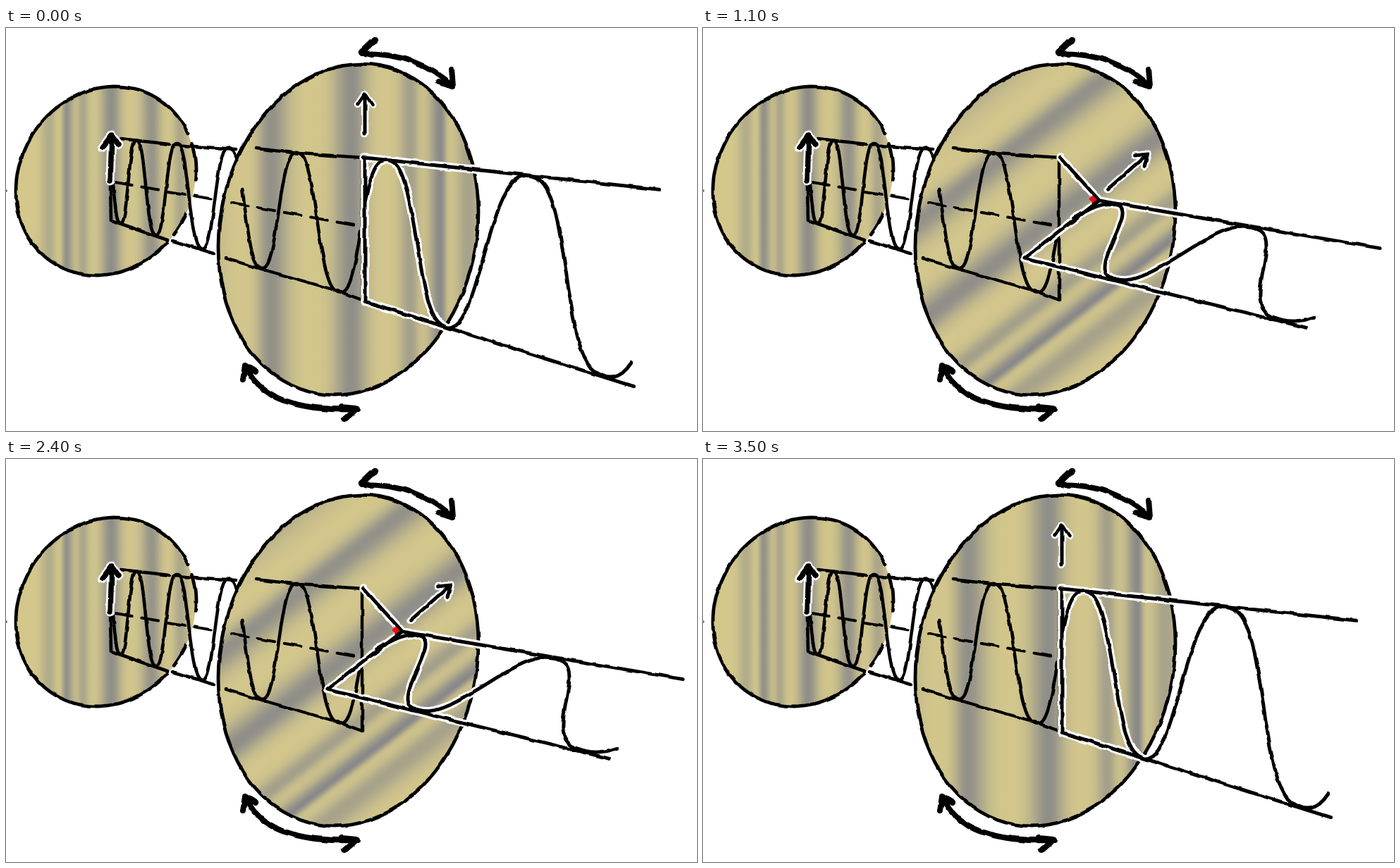
Animation, 980 px wide and 572 px high, one loop 3.6 s. Source, as an HTML page:

```html
<!DOCTYPE html>
<html lang="en">
<head>
<meta charset="utf-8">
<title>Rotating polariser</title>
<style>
  html, body { margin: 0; width: 100%; height: 100%; overflow: hidden; background: #fff; }
  svg { display: block; width: 980px; height: 572px; }
  .ink, .halo { fill: none; stroke-linecap: round; stroke-linejoin: round; }
  .ink { stroke: #000; }
  .halo { stroke: #fff; }
</style>
</head>
<body>
<svg id="stage" viewBox="0 0 980 572">
  <defs>
    <filter id="rough" filterUnits="userSpaceOnUse" x="0" y="0" width="980" height="572" color-interpolation-filters="sRGB">
      <feTurbulence type="fractalNoise" baseFrequency="0.05" numOctaves="2" seed="4"/>
      <feDisplacementMap in="SourceGraphic" scale="4" xChannelSelector="R" yChannelSelector="G"/>
    </filter>
  </defs>
</svg>
<script>
const stage = document.getElementById('stage');
const defs = stage.querySelector('defs');

function add(parent, tag, attrs) {
  const el = document.createElementNS('http://www.w3.org/2000/svg', tag);
  for (const key in attrs) el.setAttribute(key, attrs[key]);
  return parent.appendChild(el);
}

const ink = (parent, d, width, extra) =>
  add(parent, 'path', { class: 'ink', d, 'stroke-width': width, ...extra });
const halo = (parent, d, width) =>
  add(parent, 'path', { class: 'halo', d, 'stroke-width': width });

// Path along point(u) for u between two values
function trace(point, from, to, count = 90) {
  const points = [];
  for (let i = 0; i <= count; i++) {
    points.push(point(from + (to - from) * i / count).map(v => v.toFixed(2)));
  }
  return 'M' + points.join('L');
}

// Discs are slightly skewed ellipses
const disc = (cx, cy, rx, ry) => u => [cx + rx * Math.cos(u), cy + ry * Math.sin(u - .105)];

// Each dark band: centre, spread to the left, spread to the right, strength
function stripes(id, x1, x2, bands) {
  const grad = add(defs, 'linearGradient', { id, gradientUnits: 'userSpaceOnUse', x1, x2, y1: 0, y2: 0 });
  const tan = [211, 199, 140], grey = [143, 142, 137];
  for (let x = x1; x <= x2; x += 4) {
    const shade = bands.reduce((sum, [mid, left, right, strength]) =>
      sum + strength * Math.exp(-(((x - mid) / (x < mid ? left : right)) ** 2)), 0);
    const rgb = tan.map((v, i) => Math.round(v + (grey[i] - v) * shade));
    add(grad, 'stop', { offset: (x - x1) / (x2 - x1), 'stop-color': `rgb(${rgb})` });
  }
  return grad;
}

stripes('smallStripes', 14, 270, [
  [61, 11, 9, .5], [85, 5, 10, 1], [109, 7, 8, .6], [149, 14, 14, 1], [207, 15, 12, .9], [248, 10, 10, .6]]);
const bigStripes = stripes('bigStripes', 269, 749, [
  [275, 30, 30, .5], [375, 18, 26, .95], [490, 25, 22, 1], [574, 16, 11, .7], [617, 16, 7, 1.1], [655, 16, 22, .65]]);

const small = disc(141.5, 217, 127.5, 134);
const big = disc(485.5, 286, 184.5, 235);
const turn = 2 * Math.PI;

add(stage, 'path', { d: trace(small, 0, turn), fill: 'url(#smallStripes)' });
add(stage, 'path', { d: trace(big, 0, turn), fill: 'url(#bigStripes)' });
add(stage, 'circle', { cx: 0, cy: 231, r: 2, fill: '#777' });

const still = add(stage, 'g', { filter: 'url(#rough)' });
ink(still, trace(small, .82, turn - .42) + trace(small, -.3, .1) + trace(small, .47, .71), 4.8);
ink(still, trace(big, 0, turn), 4.8);

// Swing of the wave in half periods: crests at odd, troughs at even k
function swing(k) {
  const c = -Math.cos(Math.PI * k);
  return c * (1.3 - .3 * c * c);
}

// Incoming wave between its two envelope lines, wider with each half period
function incoming(k) {
  const x = -5 + 167 * 1.14 ** k;
  const top = 157 + (x - 150) * .0754, bottom = 273 + (x - 149) * .317;
  return [x, (top + bottom) / 2 - swing(k) * (bottom - top) / 2];
}

ink(still, 'M163 157L232 165M238 166L327 172M148 225L149 273L229 301M236 302L295 320', 4.6);
ink(still, 'M355 171L416 178L507 184M312 327L362 342L470 373L505 386V186', 4.4);
ink(still, 'M155 219L300 244M320 248L500 281', 4, { 'stroke-dasharray': '24 14' });
ink(still, trace(incoming, -.62, 5.27) + trace(incoming, 5.43, 8.49), 4.6);

const leftArrow = 'M148 217L150 152M136 170L150 152L160 166';
halo(still, leftArrow, 13);
ink(still, leftArrow, 7.5);

// Turning arrows
ink(still, 'M505 36Q585 36 633 83M523 17L504 35L519 38M632 58L634 83L613 77', 8);
ink(still, 'M339 479Q367 546 498 541M336 499L339 479L354 488M480 555L497 540L477 538', 8);

// Outgoing wave
const moving = add(stage, 'g', { filter: 'url(#rough)' });
const waveHalo = halo(moving, '', 11.5);
const arrowHalo = halo(moving, '', 10.5);
const square = add(moving, 'path', { fill: '#f00d12' });
const waveInk = ink(moving, '', 5);
const arrowInk = ink(moving, '', 5);

const last = 17;
const near = [509, 286], far = [908, 369];

// Cubic through values set at four steps of the turn
function through(s, values) {
  const at = [0, 4, 11, last];
  return values.reduce((sum, v, i) =>
    sum + at.reduce((w, b, j) => i === j ? w : w * (s - b) / (at[i] - b), v), 0);
}

const mix = (a, b, t) => a.map((v, i) => v + (b[i] - v) * t);
const shift = (p, v, k) => [p[0] + v[0] * k, p[1] + v[1] * k];
const polar = (angle, r) => shift(near, [Math.sin(angle), -Math.cos(angle)], r);

function unit(from, to) {
  const dx = to[0] - from[0], dy = to[1] - from[1], len = Math.hypot(dx, dy) || 1;
  return [dx / len, dy / len];
}

function pose(s) {
  // The turn is seen from the side, so its sideways part is shortened
  const spin = s / last * Math.PI / 2;
  const angle = Math.atan2(.8 * Math.sin(spin), Math.cos(spin));
  bigStripes.setAttribute('gradientTransform', `rotate(${angle * 180 / Math.PI} ${near.join(' ')})`);

  // Swing vectors at both ends
  const reach = Math.max(0, Math.cos(angle)) ** .85;
  const v = [102 * reach * Math.sin(angle), -102 * reach * Math.cos(angle)];
  const farV = [18.5 * reach + .75 * v[0], 1.37 * v[1]];
  const tip = shift(near, v, 1), foot = shift(near, v, -1);

  const outgoing = k => {
    const x = 100 + 440 * 1.2 ** (k - 9);
    const t = (x - near[0]) / (far[0] - near[0]);
    const [vx, vy] = mix(v, farV, t);
    return shift(mix(near, far, t), [.8 * vx, vy], swing(k));
  };
  const d = `M507 184L${tip}L${shift(far, farV, 1)}M${tip}L${foot}L${shift(far, farV, -1)}`
    + trace(outgoing, 8.6, 12.27);
  waveHalo.setAttribute('d', d);
  waveInk.setAttribute('d', d);

  const tail = polar(angle * .93, through(s, [136, 110, 86, 40]));
  const head = polar(angle * .93, through(s, [192, 163, 162, 110]));
  const dir = Math.atan2(head[1] - tail[1], head[0] - tail[0]);
  const barb = side => shift(head, [Math.cos(dir + side), Math.sin(dir + side)], -18);
  const arrow = `M${tail}L${head}M${barb(.6)}L${head}L${barb(-.6)}`;
  arrowHalo.setAttribute('d', arrow);
  arrowInk.setAttribute('d', arrow);

  // Right-angle mark where the projection meets the axis
  const a = unit(tip, foot), b = unit(tip, [507, 184]);
  const corner = (i, j) => shift(shift(tip, a, i), b, j);
  square.setAttribute('d', s > 0 && s < last
    ? `M${corner(1, 1)}L${corner(11, 1)}L${corner(11, 11)}L${corner(1, 11)}Z` : '');
}

let shown = -1;
function tick() {
  const k = Math.floor(performance.now() / 100) % 36;
  const s = Math.min(k, 35 - k);
  if (s !== shown) pose(shown = s);
  requestAnimationFrame(tick);
}
tick();
</script>
</body>
</html>
```
